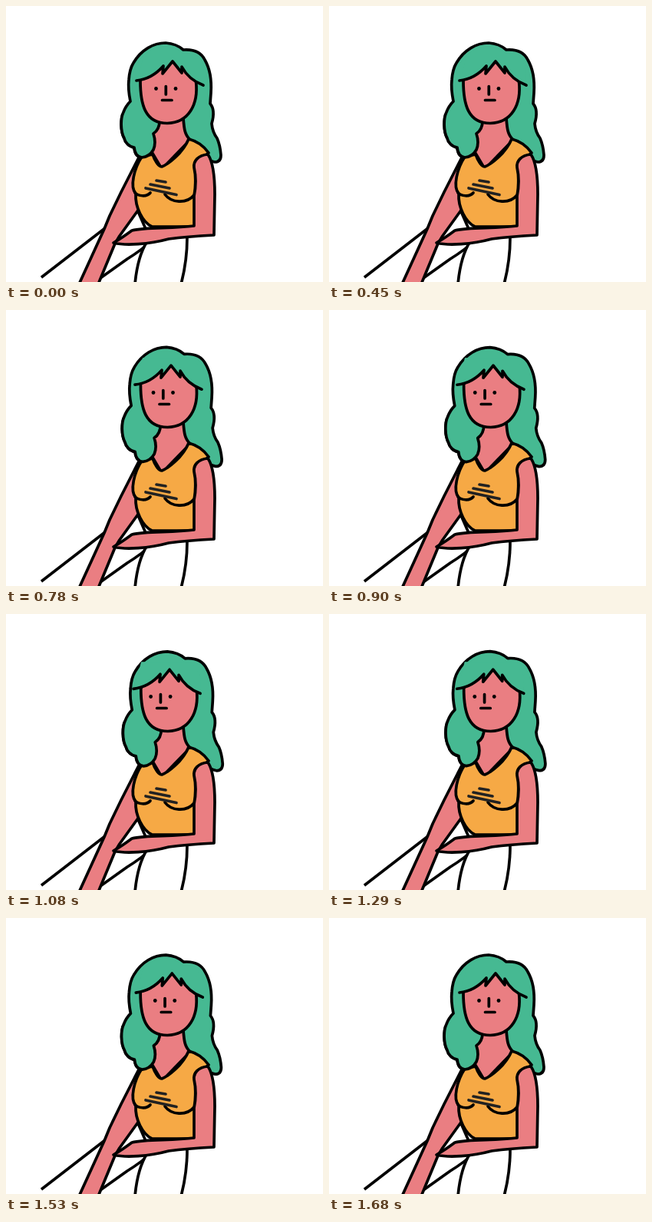
These frames come from a looping animation (413x359 px, 1.98 s). An HTML page:

```html
<!DOCTYPE html>
<html lang="en">
<head>
<meta charset="utf-8">
<title>Seated woman turning her head</title>
<style>
  html, body { margin: 0; width: 100%; height: 100%; overflow: hidden; background: #fff; }
  svg { display: block; width: 100vw; height: 100vh; }
  .ink { fill: none; stroke: #000; stroke-width: 3.7; stroke-linecap: round; stroke-linejoin: round; }
  .white { fill: #fff; stroke-linecap: butt; }
  .skin { fill: #ea7e82; }
  .shirt { fill: #f6a945; }
  .hair { fill: #46b992; }
  .print { stroke: #222; }
</style>
</head>
<body>
<svg viewBox="0 0 413 359">
  <defs>
    <clipPath id="leftSide"><rect x="140" y="140" width="72" height="70"/></clipPath>
    <path id="hair" class="ink hair" d="M200 146 Q201 160 192 166 C194 172 195 180 192 187 Q187 196 177 197
      Q168 196 167 184 C160 183 155 177 154 172 C149 163 149 146 153 138 Q156 130 162 124
      C160 114 159 105 160 96 Q161 82 166 74 C176 57 192 48 208 48 Q222 49 231 57
      C244 56 254 60 259 70 C266 82 268 98 267 113 L266 127 C272 134 270 146 268 153
      Q269 164 275 172 Q279 181 280 194 Q280 203 272 203 Q262 201 258 195 L225 185 V146 Z"/>
  </defs>

  <g class="ink">
    <path class="white" d="M46 353 L129 289 L168 258 L189 306 Q176 318 158 329 L120 356"/>
    <path class="white" d="M184 306 C175 320 170 340 168 362 H228 C233 343 236 323 236 301"/>
    <path class="skin" d="M173 197 L150 242 L135 273 L128 290 L95 362 H120 L142 309 L148 299 L174 263 L170 235 L178 200 Z"/>
  </g>

  <use class="headShift" href="#hair"/>

  <g class="ink">
    <path class="skin" d="M190 146 V190 L203 212 L240 174 C233 168 232 160 231 146"/>
    <path class="shirt" d="M191 193 C194 202 199 209 203 209 C211 206 230 192 238 173 Q254 177 264 191 L247 206 L246 287
      H190 C178 281 168 262 169 244 C161 235 167 211 177 196 Z"/>
    <path d="M168 243 C172 247 183 249 188 243 M207 245 C215 256 235 258 245 246"/>
    <path class="print" d="M196 227 L208 229 M188 232 L213 237 M182 237 L222 245.5"/>
    <path class="skin" d="M245 210 C244 202 250 194 263 193 C270 203 272 225 272 245 L271 298 Q235 300 212 303
      C186 310 156 312 140 308 C147 304 156 298 164 292 C183 287 215 290 245 286 V247 Q249 228 245 210 Z"/>
  </g>

  <g clip-path="url(#leftSide)"><use class="headShift" href="#hair"/></g>

  <path id="face" class="ink skin" d="M175 97 C175 128 181 152.5 210 152.5 C238 152 251 128 247.5 98 L234 66 H190 Z"/>
  <g id="bangs">
    <path class="hair" d="M170 97 Q190 95 205 78 L204 88 L217 72 L229 87 V79 Q238 96 257 103 V80 L246 62 H180 L176 78 Z"/>
    <path class="ink" d="M170 97 Q190 95 205 78 L204 88 L217 72 L229 87 V79 Q238 96 257 103"/>
  </g>
  <g id="features">
    <circle cx="195.5" cy="107.5" r="2.4"/>
    <circle cx="221" cy="107.5" r="2.4"/>
    <path class="ink" d="M208.3 104.5 V115 M203.5 122.5 H216"/>
  </g>
</svg>
<script>
  const LOOP = 1980, REST = 450, STEP = 30, TURN = 24, STEPS = 42;
  const ease = x => (1 - Math.cos(Math.PI * x)) / 2;
  const shift = (selector, x, y) => {
    for (const part of document.querySelectorAll(selector))
      part.setAttribute("transform", `translate(${x} ${y})`);
  };

  function draw(now) {
    const time = now % LOOP;
    const step = Math.max(0, Math.min(STEPS, Math.floor((time - REST) / STEP) + 1));
    const turn = ease(step < TURN ? step / TURN : (STEPS - step) / (STEPS - TURN));
    shift(".headShift", 2.3 * turn, 0.8 * turn);
    shift("#face", 0.8 * turn, 0);
    shift("#bangs", -4 * turn, 0.3 * turn);
    shift("#features", -7 * turn, 0);
  }

  const start = performance.now();
  function tick() {
    draw(performance.now() - start);
    requestAnimationFrame(tick);
  }
  tick();
</script>
</body>
</html>
```
